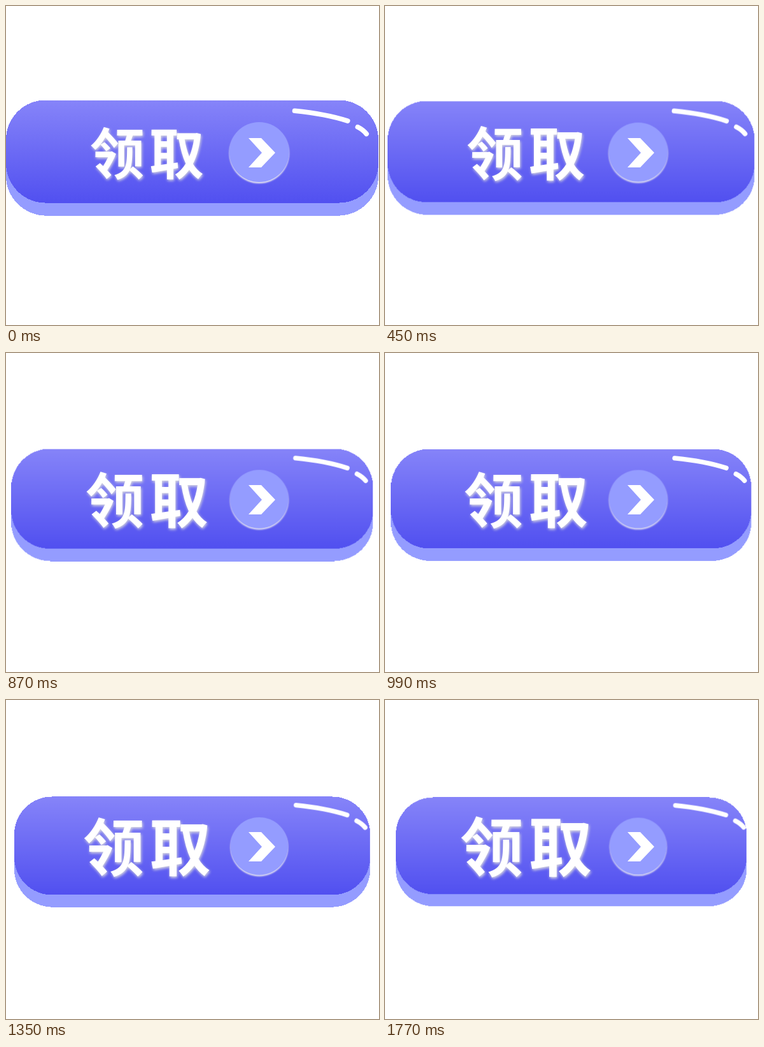
An HTML page for the animation above (1800 ms loop, 586 px wide and 500 px high).

```html
<!DOCTYPE html>
<html lang="zh-CN">
<head>
<meta charset="utf-8">
<title>领取</title>
<style>
  html, body { margin: 0; width: 100%; height: 100%; overflow: hidden; background: #fff; }
  svg { display: block; width: 586px; height: 500px; }

  .scale { animation: scale 1800ms steps(60) infinite; }
  .button { --end: 0.9415; transform-origin: 292.5px 238.1px; }
  .shine { --end: 0.95; transform-origin: 510px 182px; }
  .disc { --end: 0.95; transform-origin: 397.8px 229px; }
  .label { --end: 1.16; transform-origin: 221px 233.5px; }
  @keyframes scale {
    from { transform: scale(1); }
    to { transform: scale(var(--end)); }
  }

  .button { shape-rendering: crispEdges; }
  .shine { fill: none; stroke: #fff; stroke-width: 7.6; stroke-linecap: round; }
  .disc { fill: #949cff; filter: drop-shadow(0 2px 1.3px #ecebf0); }
  .label {
    font: 700 86px "Noto Sans CJK SC", "Noto Sans CJK", "Noto Sans CJK JP", sans-serif;
    fill: #fff;
    filter: drop-shadow(1px 2.5px 2px #dadade);
  }
</style>
</head>
<body>
<svg viewBox="0 0 586 500">
  <defs>
    <linearGradient id="face" x1="0" y1="0" x2="0" y2="1">
      <stop offset="0" stop-color="#8684f9"/>
      <stop offset="1" stop-color="#5150f0"/>
    </linearGradient>
  </defs>

  <g class="scale button">
    <rect y="167.6" width="585" height="161.1" rx="64" ry="62" fill="#949cff"/>
    <rect y="147.52" width="585" height="161.03" rx="62" fill="url(#face)"/>
  </g>

  <g class="scale shine">
    <path d="M453.5 164.3Q502 169 536.8 180.2"/>
    <path d="M552.5 189.7Q561 194 566.3 200.5"/>
  </g>

  <text class="scale label" x="131.7 224.8" y="263.6">领取</text>

  <circle class="scale disc" cx="397.8" cy="229" r="47"/>
  <path fill="#fff" d="M381 207H401L423 230L401 253H381L402 230Z"/>
</svg>
</body>
</html>
```
